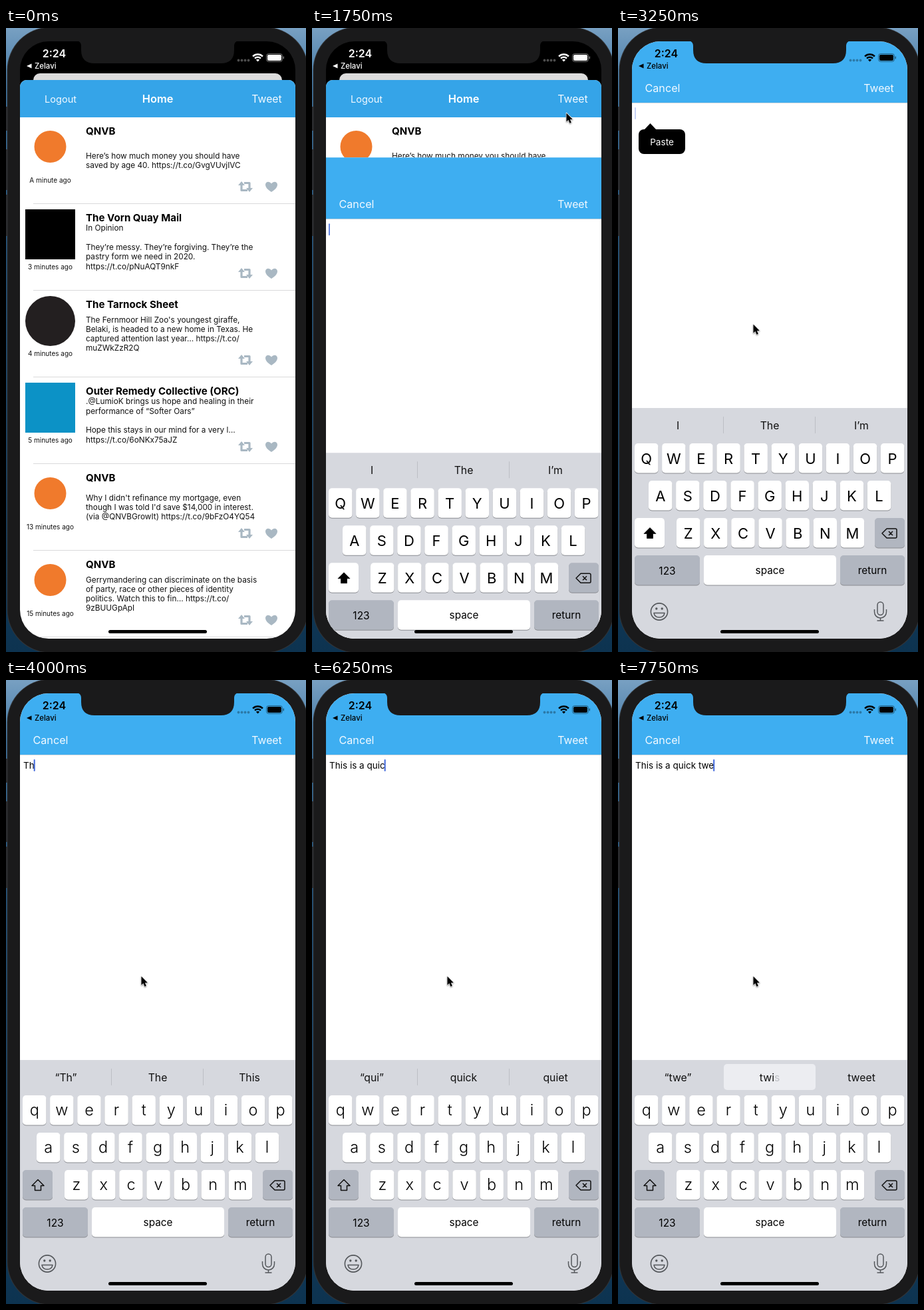
An HTML page with a canvas for the animation above (8000 ms loop, 451x936 px).

```html
<!DOCTYPE html>
<html lang="en">
<head>
<meta charset="utf-8">
<title>Compose</title>
<style>
html, body { margin: 0; width: 100%; height: 100%; overflow: hidden; background: #123a5a; }
canvas { display: block; width: 451px; height: 936px; }
</style>
</head>
<body>
<canvas id="stage"></canvas>
<script>
const W = 451, H = 936, LOOP = 8000, STEP = 250;
const canvas = document.getElementById('stage');
const c = canvas.getContext('2d');
const dpr = window.devicePixelRatio || 1;
canvas.width = W * dpr;
canvas.height = H * dpr;

const ICON = '#a9b8c3', BODY = '#1a1a1b';
const PEACH = ['#f07a2c', 'dot', 24];
const POSTS = [
  ['QNVB', 'A minute ago', PEACH,
    'Here’s how much money you should have|saved by age 40. https://t.co/GvgVUvjIVC'],
  ['The Vorn Quay Mail', '3 minutes ago', ['#000', 'box'],
    'In Opinion||They’re messy. They’re forgiving. They’re the|pastry form we need in 2020.|https://t.co/pNuAQT9nkF'],
  ['The Tarnock Sheet', '4 minutes ago', ['#231f20', 'dot', 37.5],
    'The Fernmoor Hill Zoo\'s youngest giraffe,|Belaki, is headed to a new home in Texas. He|captured attention last year… https://t.co/|muZWkZzR2Q'],
  ['Outer Remedy Collective (ORC)', '5 minutes ago', ['#0c92c6', 'box'],
    '.@LumioK brings us hope and healing in their|performance of “Softer Oars”||Hope this stays in our mind for a very l…|https://t.co/6oNKx75aJZ'],
  ['QNVB', '13 minutes ago', PEACH,
    'Why I didn\'t refinance my mortgage, even|though I was told I\'d save $14,000 in interest.|(via @QNVBGrowIt) https://t.co/9bFzO4YQ54'],
  ['QNVB', '15 minutes ago', PEACH,
    'Gerrymandering can discriminate on the basis|of party, race or other pieces of identity|politics. Watch this to fin… https://t.co/|9zBUUGpApI']
];

// Pointer path: time, x, y
const POINTER = [[750, 446, 330], [1000, 418, 190], [1250, 402, 117], [1500, 402, 117],
  [1750, 382, 127], [2000, 287, 178], [2250, 222, 380], [2500, 203, 444]];

// Typing, one entry per step: letters shown and the three suggestions (* = middle one lit)
const MESSAGE = 'This is a quick twe';
const TYPE_START = 3750;
const TYPING = [
  [1, 'I,The,I’m'], [2, '“Th”,The,This'], [3, '“Thi”,This,Think'], [4, '“This”,This is,This'],
  [6, 'is,was,will'], [8, '*“i”,I,is'], [9, 'a,the,my'], [10, '“a”,and,at'],
  [11, 'great,good,new'], [13, '“qu”,quick,quite'], [14, '“qui”,quick,quiet'], [15, '“quic”,quick,quickly'],
  [16, '“quick”,quick,quickly'], [16, 'and,question,one'], [17, 'and,question,one'],
  [18, '“t”,to,the'], [19, '*“twe”,twi~s,tweet']
];

function text(s, x, y, size, color, align = 'left', weight = 400) {
  c.font = `${weight} ${size}px Inter, "Liberation Sans", sans-serif`;
  c.fillStyle = color;
  c.textAlign = align;
  c.fillText(s, x, y);
}

function box(x, y, w, h, r, color) {
  c.fillStyle = color;
  c.beginPath();
  c.roundRect(x, y, w, h, r);
  c.fill();
}

function dot(x, y, r, color) {
  c.fillStyle = color;
  c.beginPath();
  c.arc(x, y, r, 0, Math.PI * 2);
  c.fill();
}

function shape(d, x, y, fill, stroke, width = 1.5) {
  c.save();
  c.translate(x, y);
  const p = new Path2D(d);
  if (stroke) {
    c.strokeStyle = stroke;
    c.lineWidth = width;
    c.lineJoin = 'round';
    c.stroke(p);
  }
  if (fill) {
    c.fillStyle = fill;
    c.fill(p);
  }
  c.restore();
}

function backdrop() {
  const g = c.createLinearGradient(0, 0, 0, H);
  g.addColorStop(0, '#78a0c2');
  g.addColorStop(0.1, '#3f76a3');
  g.addColorStop(0.35, '#23557e');
  g.addColorStop(1, '#0d3350');
  c.fillStyle = g;
  c.fillRect(0, 0, W, H);
  for (const [y, h] of [[118, 36], [182, 61], [250, 62]]) box(-3, y, 8, h, 2, '#28292b');
  box(1.5, -1.5, 453, 939, 65, '#333538');
  box(2.5, -0.5, 451, 937, 64, BODY);
}

function post([name, age, [color, kind, r], body], top) {
  if (kind === 'dot') dot(66.5, top + (r > 30 ? 45.5 : 44), r, color);
  else box(29, top + 8, 75, 75, 0, color);
  text(age, 66.5, top + 98, 10, '#111', 'center');
  text(name, 120, top + 25.5, 15.1, '#000', 'left', 700);
  const lines = body.split('|');
  lines.forEach((s, i) =>
    text(s, 120, top + 69 + (i - (lines.length - 1) / 2) * 14.3, 11.8, '#111'));
  shape('M-6-4V5.5H3M-2-5.5H6V4', 360, top + 104, null, ICON, 3.2);
  shape('M-11-2L-6-8L-1-2ZM1 2L6 8L11 2Z', 360, top + 104, ICON);
  shape('M0 8C-5 5-9 1-9-3C-9-8-3-9 0-4.5C3-9 9-8 9-3C9 1 5 5 0 8Z', 399, top + 104, ICON);
  box(41, top + 129, 394, 1, 0, '#d9d9db');
}

function home(tweetAlpha) {
  c.fillStyle = '#000';
  c.fillRect(21, 20, 414, 896);
  box(41, 68, 374, 30, 10, '#dcdcdc');
  box(21, 78, 414, 860, [10, 10, 0, 0], '#fff');
  box(21, 78, 414, 56, [10, 10, 0, 0], '#35a4e8');
  text('Logout', 82, 112, 14.6, '#f2f9ff', 'center');
  text('Home', 228, 112, 16.4, '#fff', 'center', 600);
  c.globalAlpha = tweetAlpha;
  text('Tweet', 392, 112, 15.8, '#f2f9ff', 'center');
  c.globalAlpha = 1;
  POSTS.forEach((p, i) => post(p, 134 + 130 * i));
}

function key(x, y, w, label, color = '#fff', size = 16, dy = 6, weight = 400) {
  box(x, y + 1, w, 44.5, 5, '#8b8d92');
  box(x, y, w, 44.5, 5, color);
  text(label, x + w / 2, y + 22.5 + dy, size, '#000', 'center', weight);
}

function suggestion(s, x) {
  const [main, faint] = s.split('~');
  if (!faint) return text(s, x, 601.5, 15.8, '#111', 'center');
  text(main, x + 7, 601.5, 15.8, '#111', 'right');
  text(faint, x + 7, 601.5, 15.8, '#bfc0c5');
}

function suggestions(list) {
  const lit = list[0] === '*';
  if (lit) box(159, 576, 138, 39, 5, '#ecedf1');
  else for (const x of [158, 296]) box(x, 583, 1, 25, 0, '#bcbec4');
  list.slice(lit ? 1 : 0).split(',').forEach((s, i) => suggestion(s, 90 + 138 * i));
}

function keyboard(dy, upper, list) {
  const grey = '#b1b6c0', line = '#55585c';
  const letter = upper ? [22, 8, 400] : [23.5, 7, 300];
  c.save();
  c.translate(0, dy);
  box(21, 570, 414, 350, 0, '#d6d8de');
  suggestions(list);
  [['QWERTYUIOP', 25], ['ASDFGHJKL', 46], ['ZXCVBNM', 88]].forEach(([row, x], r) =>
    [...row].forEach((k, i) =>
      key(x + 41.1 * i, 623 + 56 * r, 35.5, upper ? k : k.toLowerCase(), '#fff', ...letter)));
  key(25, 735, 45, '', upper ? '#fff' : grey);
  shape('M0-8.5L9 .5H4.5V7.5H-4.5V.5H-9Z', 48, 758, upper ? '#000' : null, '#111', upper ? 0.8 : 1.5);
  key(386, 735, 45, '', grey);
  shape('M-11 0L-4-7H9Q11-7 11-5V5Q11 7 9 7H-4ZM-1-3L5 3M5-3L-1 3', 408, 758, null, '#111');
  key(25, 791, 98, '123', grey, 15.5);
  key(129, 791, 199, 'space', '#fff', 15.3, 5);
  key(334, 791, 97, 'return', grey, 15.3, 5);
  shape('M12.6 0A12.6 12.6 0 1 1-12.6 0A12.6 12.6 0 1 1 12.6 0ZM-8 2H8Q7 8.5 0 8.5Q-7 8.5-8 2Z', 62, 875.5, null, line, 1.6);
  dot(57.8, 871, 1.7, line);
  dot(66.2, 871, 1.7, line);
  shape('M-4.5-9.5A4.5 4.5 0 0 1 4.5-9.5V1A4.5 4.5 0 0 1-4.5 1ZM-9-3V1A9 9 0 0 0 9 1V-3M0 10V14M-5 14H5', 394.5, 875, null, line, 1.5);
  c.restore();
}

function paste() {
  shape('M39 153L48.5 143L58 153Z', 0, 0, '#000');
  box(31, 152, 70, 37, 8, '#000');
  text('Paste', 66, 175.5, 13.6, '#fff', 'center');
}

function compose(t, dy) {
  const typed = t >= TYPE_START;
  const count = typed ? TYPING[(t - TYPE_START) / STEP][0] : 0;
  c.save();
  c.translate(0, dy);
  box(21, 20, 414, 896, 0, '#fff');
  box(21, 20, 414, 92, 0, '#3eaef1');
  box(21, 112, 414, 0.5, 0, '#a9b4bb');
  text('Cancel', 67, 96, 16.2, '#f2f9ff', 'center');
  text('Tweet', 392, 96, 15.8, '#f2f9ff', 'center');
  const s = MESSAGE.slice(0, count);
  text(s, 26, 133, 13.5, '#000');
  c.globalAlpha = typed ? 1 : [1, 0.3, 0, 0.8][t % 1000 / STEP];
  box(25 + c.measureText(s).width, 119, 2, 18, 1, '#4068dc');
  c.globalAlpha = 1;
  if (t === 3000 || t === 3250) paste();
  c.restore();
}

function status(color) {
  text('2:24', 72.5, 43.5, 16, color, 'center', 600);
  shape('M31 57L38.5 53.5V60.5Z', 0, 0, color);
  text('Zelavi', 43, 61, 11.4, color, 'left', 500);
  c.globalAlpha = 0.3;
  for (let i = 0; i < 4; i++) dot(349.5 + 5 * i, 48.5, 1.9, color);
  c.globalAlpha = 1;
  c.strokeStyle = color;
  c.lineWidth = 2.6;
  for (const r of [10.5, 6.3]) {
    c.beginPath();
    c.arc(378.5, 50, r, -Math.PI * 0.75, -Math.PI * 0.25);
    c.stroke();
  }
  shape('M0 0L-2.6-2.8Q0-4.6 2.6-2.8Z', 378.5, 50.5, color);
  c.globalAlpha = 0.45;
  c.lineWidth = 1;
  c.beginPath();
  c.roundRect(391.5, 38.5, 24, 12, 3.6);
  c.stroke();
  box(416.5, 42.5, 1.5, 4, 1, color);
  c.globalAlpha = 1;
  box(393, 40, 21, 9, 2.2, color);
}

function pointer(t) {
  if (t < POINTER[0][0]) return;
  const [, x, y] = POINTER.filter(p => p[0] <= t).pop();
  c.save();
  c.shadowColor = 'rgba(0,0,0,.3)';
  c.shadowBlur = 2;
  c.shadowOffsetY = 1;
  shape('M0 0V13L2.9 10.3L5 15.2L7.3 14.2L5.3 9.4H9.3Z', x + 0.5, y + 0.5, '#000', '#fff', 1.6);
  c.restore();
}

// Critically damped spring: fraction of the way still to go
function spring(ms) {
  const u = Math.max(0, ms) * 0.01826;
  return (1 + u) * Math.exp(-u);
}

function draw(t) {
  c.setTransform(dpr, 0, 0, dpr, 0, 0);
  backdrop();
  const left = t < 2250 ? spring(t - 1584) : 0;
  const rise = 896 * left;
  c.save();
  c.beginPath();
  c.roundRect(21, 20, 414, 896, 43);
  c.clip();
  if (left) home(t === 1500 ? 0.2 : 1);
  if (t >= 1750) {
    compose(t, rise);
    const list = t >= TYPE_START ? TYPING[(t - TYPE_START) / STEP][1] : 'I,The,I’m';
    keyboard(346 * left, t < TYPE_START, list);
  }
  shape('M106 19Q113 20 113 27V33Q113 53 133 53H323Q343 53 343 33V27Q343 20 350 19Z', 0, 0, BODY);
  status(rise > 30 ? '#fff' : '#000');
  box(154, 903, 148, 5, 2.5, '#000');
  c.restore();
  pointer(t);
}

let start, shown = -1;
function tick(now) {
  if (start === undefined) start = now;
  const t = Math.floor((now - start) % LOOP / STEP) * STEP;
  if (t !== shown) draw(shown = t);
  requestAnimationFrame(tick);
}
draw(0);
requestAnimationFrame(tick);
</script>
</body>
</html>
```
